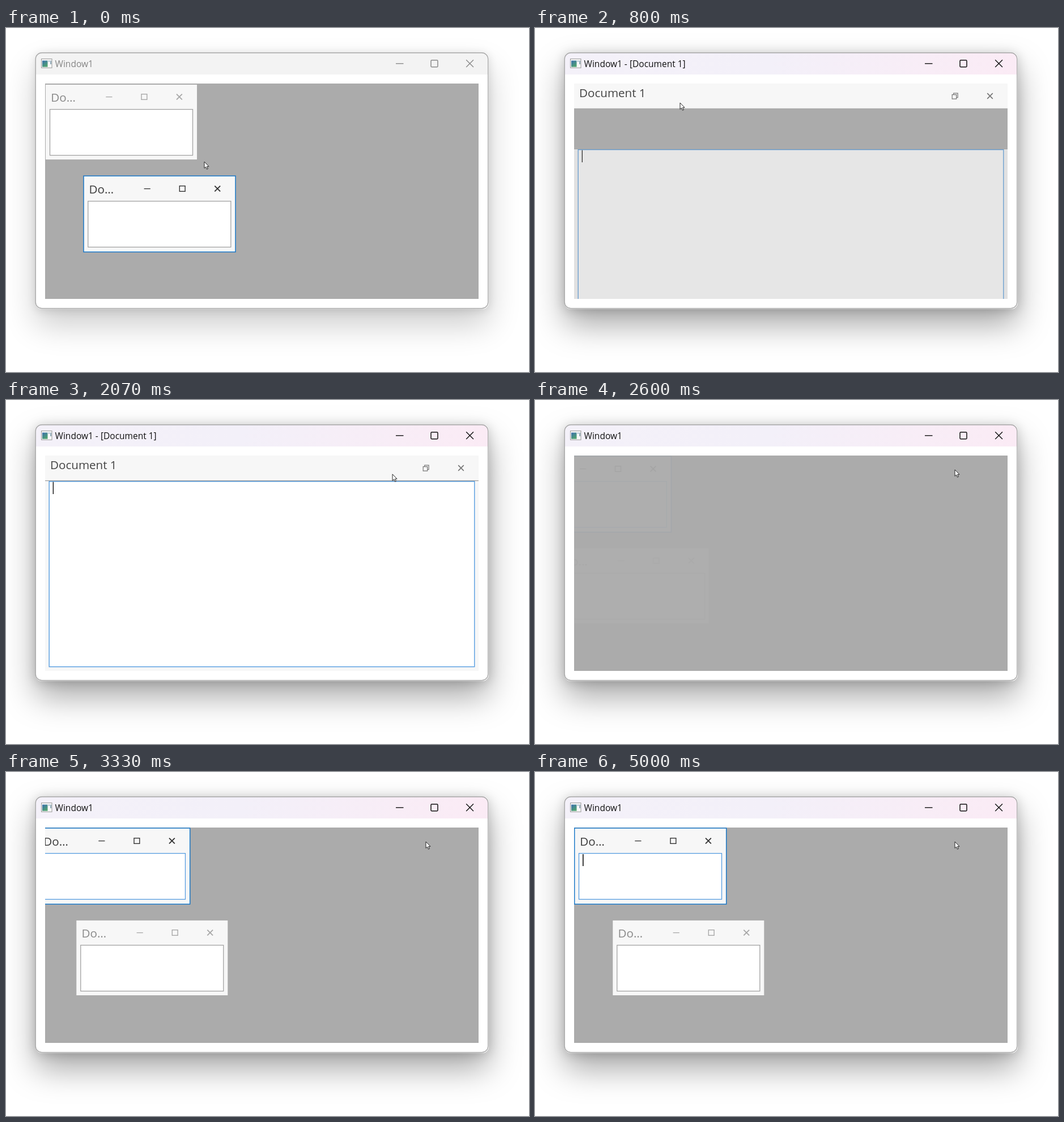
Recreate the animation shown at these times as an HTML page. Size 923 px wide and 607 px high, loop 5340 ms.

```html
<!DOCTYPE html>
<html lang="en">
<head>
<meta charset="utf-8">
<title>Window1</title>
<style>
html, body { margin: 0; width: 100%; height: 100%; overflow: hidden; background: #fff; }
#win {
  position: absolute; left: 51.5px; top: 43px; width: 800px; height: 452.5px;
  box-sizing: border-box; border-radius: 11px; background: #fff;
  box-shadow: 0 28px 56px rgba(0,0,0,.2), 0 2px 16px rgba(0,0,0,.12);
}
#win.active { box-shadow: 0 28px 56px rgba(0,0,0,.34), 0 2px 20px rgba(0,0,0,.18); }
svg { position: absolute; left: 0; top: 0; display: block; }
text { font-family: "Open Sans", "Noto Sans", sans-serif; }
.doc { font-size: 20.6px; }
.ico { fill: none; }
</style>
</head>
<body>
<div id="win"></div>
<svg id="stage" width="923" height="607" viewBox="0 0 923 607">
  <defs>
    <linearGradient id="mica">
      <stop offset="0" stop-color="#f4f1f9"/><stop offset=".45" stop-color="#f3f0f9"/>
      <stop offset="1" stop-color="#fbebf5"/>
    </linearGradient>
    <linearGradient id="pane" x2=".6" y2="1">
      <stop offset="0" stop-color="#3d6fb0"/><stop offset="1" stop-color="#4fa36f"/>
    </linearGradient>
    <clipPath id="area"><rect x="69" y="98" width="765" height="380"/></clipPath>
  </defs>
</svg>
<script>
const LOOP = 5340;
const ACTIVATE = 530, RETITLE = 670, MAXIMIZE = 730, RESTORE = 2570;
const CARET_OFF = [[1270, 1800], [2330, 2570], [3330, 3870], [4530, 5000]];
const BLUE = '#1a78c8', FOCUS = '#569de0', HOVER = '#6096bf';

const stage = document.getElementById('stage');
const win = document.getElementById('win');

function add(parent, tag, attrs, text) {
  const el = document.createElementNS('http://www.w3.org/2000/svg', tag);
  set(el, attrs);
  if (text) el.textContent = text;
  return parent.appendChild(el);
}
function set(el, attrs) {
  for (const k in attrs) el.setAttribute(k, attrs[k]);
}
const show = (el, on) => set(el, { visibility: on ? 'visible' : 'hidden' });
const box = (p, x, y, width, height, more) => add(p, 'rect', { x, y, width, height, ...more });
const icon = (p, d, w) => add(p, 'path', { class: 'ico', d, 'stroke-width': w });
const cross = (x, y, s) => `M${x} ${y}l${s} ${s}m0 ${-s}l${-s} ${s}`;

// Main window frame and caption
const caption = add(stage, 'path', { d: 'M52 82V54.5A11 11 0 0 1 63 43.5H840A11 11 0 0 1 851 54.5V82Z' });
box(stage, 52.2, 43.7, 798.6, 451, { rx: 11, fill: 'none', stroke: '#a8a8a8', 'stroke-width': 1.4 });
box(stage, 62.5, 54.5, 18.5, 15.8, { fill: '#f8f8f8', stroke: '#9a9a9a' });
box(stage, 64, 57.5, 9.5, 11.2, { fill: 'url(#pane)' });
box(stage, 75, 57.5, 2, 2, { fill: '#8cabc4' });
box(stage, 78.5, 57.5, 1.2, 6.5, { fill: '#49758e' });
const title = add(stage, 'text', { x: 86.6, y: 69.4, 'font-size': 15.5 });
const buttons = add(stage, 'g', {});
icon(buttons, 'M688 62.8h13.5', 1.4);
box(buttons, 750, 56.8, 12, 12, { rx: 1.6, class: 'ico', 'stroke-width': 1.5 });
icon(buttons, cross(812.2, 56.3, 12.8), 1.4);

// Client area
box(stage, 69, 98, 765, 380, { fill: '#ababab' });
const area = add(stage, 'g', { 'clip-path': 'url(#area)' });
const tiled = add(area, 'g', {});
const full = add(area, 'g', {});

function makeChild(dx, dy) {
  const g = add(tiled, 'g', { transform: `translate(${dx} ${dy})` });
  box(g, 70, 100, 267, 132, { fill: '#f7f7f7' });
  const edge = box(g, 69.7, 99, 268, 134.2, { fill: '#f7f7f7', stroke: BLUE, 'stroke-width': 1.5 });
  const hover = box(g, 213, 100, 62, 43.5, { fill: HOVER });
  const name = add(g, 'text', { x: 79.3, y: 130, class: 'doc' }, 'Do…');
  const icons = [
    icon(g, 'M176.3 121.6h11.2', 1.3),
    box(g, 239, 116.7, 9.8, 9.6, { class: 'ico', 'stroke-width': 1.4 }),
    icon(g, cross(301, 116.6, 9.8), 1.9)
  ];
  const page = box(g, 77.5, 143.6, 252, 81, { fill: '#fff', 'stroke-width': 1.3 });
  const caret = box(g, 84.1, 145, 1.5, 21, { fill: '#000' });
  return { edge, hover, name, icons, page, caret };
}
const docs = [makeChild(0, 0), makeChild(67.3, 162)];

function drawChild(c, active, focus, caret, hover) {
  show(c.edge, active);
  show(c.hover, hover);
  show(c.caret, caret);
  set(c.name, { fill: active ? '#3c3c3c' : '#8a8a8a' });
  for (const i of c.icons) set(i, { stroke: active ? '#333' : '#a8a8a8' });
  if (hover) set(c.icons[1], { stroke: '#fff' });
  set(c.page, { stroke: focus ? FOCUS : '#a3a3a3' });
}

// Maximized document
const sheet = add(full, 'g', {});
box(sheet, 69, 141.8, 765, 336.2, { fill: '#f7f7f7' });
box(sheet, 69, 141.8, 765, 1.2, { fill: '#999' });
box(sheet, 76.2, 143.7, 750.6, 327, { fill: '#fff', stroke: FOCUS, 'stroke-width': 1.4 });
const sheetCaret = box(sheet, 82.7, 144.5, 1.3, 21.5, { fill: '#000' });
box(full, 69, 98, 765, 43.8, { fill: '#f7f7f7' });
const fullHover = box(full, 710, 98, 62, 43.8, { fill: HOVER });
add(full, 'text', { x: 78, y: 122.3, class: 'doc', fill: '#444' }, 'Document 1');
const restoreIcon = icon(full, 'M736.2 117.7h7.5v7.5h-7.5zM738.7 117.5v-2.4h7.4v7.5h-2.3', 1.2);
set(icon(full, cross(798.2, 115.2, 9.6), 1.7), { stroke: '#777' });

const pointer = add(stage, 'path', {
  d: 'M0 0V11.4L2.6 9L4.4 13.2L6.3 12.4L4.6 8.3H8Z',
  fill: '#fff', stroke: '#111', 'stroke-width': .9
});

const clamp = u => Math.min(1, Math.max(0, u));
const ramp = (t, a, b) => clamp((t - a) / (b - a));
const smooth = u => u * u * (3 - 2 * u);

function pointerAt(t) {
  if (t < 1400) {
    const e = smooth(ramp(t, 0, 530));
    return [350 - 94 * e, 236 - 104 * e];
  }
  const e = smooth(ramp(t, 1470, 2237));
  return [256 + 485 * e, 132 - 9 * e ** 16];
}

// The picture advances in steps of a fifteenth of a second
function stepTime(t) {
  const r = t % 200;
  return t - r + (r < 70 ? 0 : r < 130 ? 70 : 130);
}

function render(t) {
  const active = t >= ACTIVATE;
  const maxed = t >= MAXIMIZE && t < RESTORE;
  const restored = t >= RESTORE;
  const blink = !CARET_OFF.some(([a, b]) => t >= a && t < b);
  const [x, y] = pointerAt(t);

  win.classList.toggle('active', active);
  set(caption, { fill: !active ? '#f3f3f3' : t < MAXIMIZE ? '#f5f0f6' : 'url(#mica)' });
  set(title, { fill: active ? '#111' : '#858585' });
  title.textContent = t >= RETITLE && t < RESTORE ? 'Window1 - [Document 1]' : 'Window1';
  set(buttons, { stroke: active ? '#111' : '#8a8a8a' });

  set(tiled, { display: maxed ? 'none' : 'inline' });
  set(full, { display: maxed ? 'inline' : 'none' });

  if (maxed) {
    const rise = 71 * ((1 - ramp(t, 800, 1220)) * 420 + Math.max(0, 800 - t)) ** 2 / 420 ** 2;
    set(sheet, { transform: `translate(0 ${rise.toFixed(2)})`, opacity: clamp(.71 + (t - 800) / 250) });
    show(sheetCaret, blink);
    const over = x > 710;
    show(fullHover, over);
    set(restoreIcon, { stroke: over ? '#fff' : '#777' });
  } else {
    const slide = restored ? -102 * (1 - ramp(t, RESTORE, 3620)) ** 1.6 : 0;
    set(tiled, {
      transform: `translate(${slide.toFixed(2)} 0)`,
      opacity: restored ? ramp(t, RESTORE, 3193) : 1
    });
    drawChild(docs[0], restored, restored, restored && blink, !restored && y < 143);
    drawChild(docs[1], !restored, active && !restored, active && !restored, false);
  }
  set(pointer, { transform: `translate(${x.toFixed(2)} ${y.toFixed(2)})` });
}

const start = performance.now();
function tick() {
  render(stepTime((performance.now() - start) % LOOP));
  requestAnimationFrame(tick);
}
tick();
</script>
</body>
</html>
```
